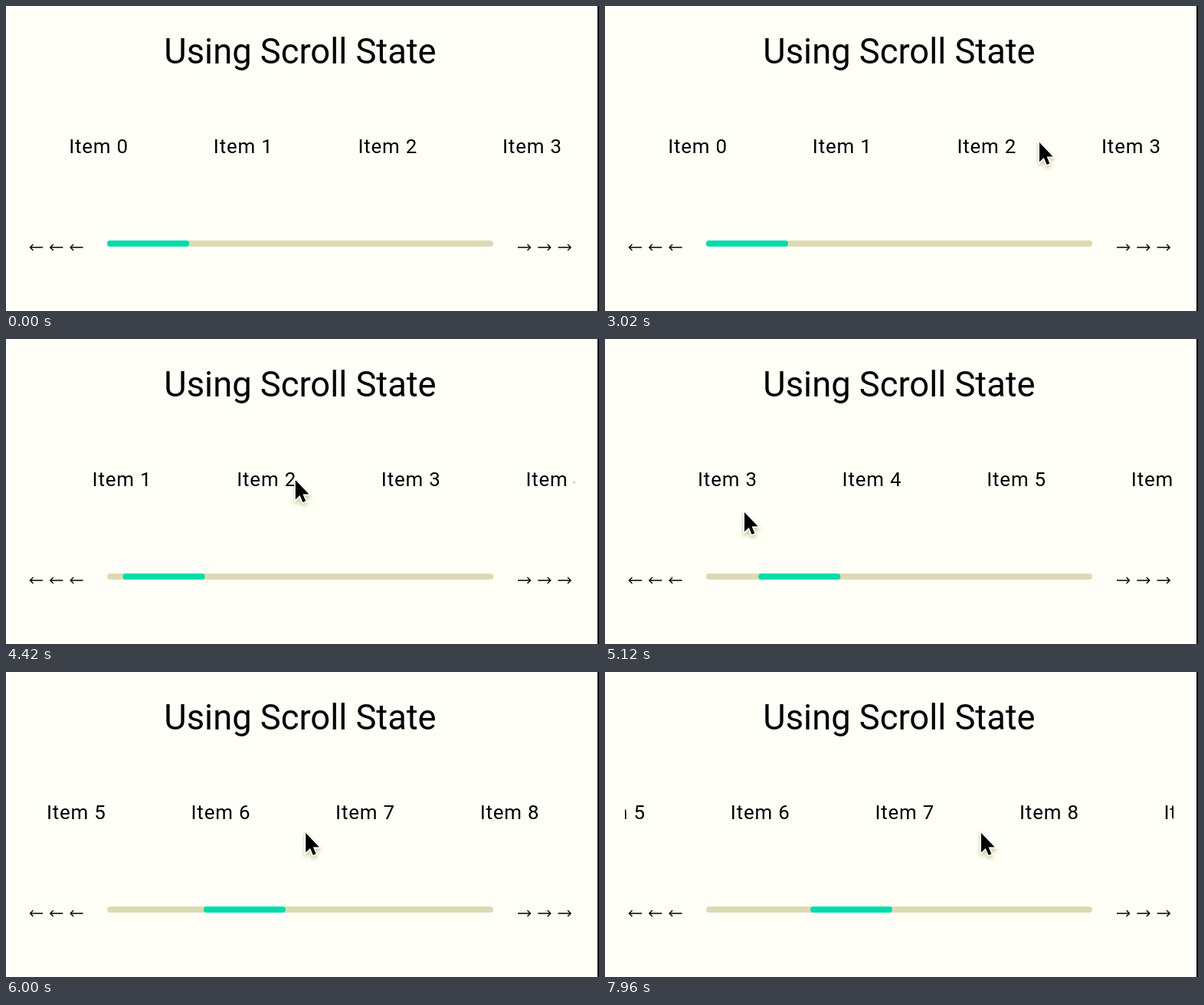
Write an HTML page with a canvas that moves like this. It is 774 px wide and 398 px high and loops after 8 s.

```html
<!DOCTYPE html>
<html lang="en">
<head>
<meta charset="utf-8">
<title>Using Scroll State</title>
<style>
  html, body { margin: 0; width: 100%; height: 100%; overflow: hidden; background: #fffff8; }
  canvas { display: block; }
</style>
</head>
<body>
<canvas id="stage" width="774" height="398"></canvas>
<script>
const ctx = document.getElementById('stage').getContext('2d');
const LOOP = 8000, PITCH = 188.6, ITEMS = 24;
const RELEASE = 4920, FLING_END = 7240, FLING_STOP = 1023, SECOND_DRAG = 7800;

// Pointer path: time, x, y
const path = [
  [0, 622, -45], [700, 622, -45], [1660, 562, 161], [1760, 562, 161],
  [2880, 567, 178], [3180, 567, 178], [3360, 536, 178], [4000, 456, 181],
  [4420, 378, 184], [4720, 322, 194], [4920, 242, 213], [5120, 182, 226],
  [5280, 182, 227], [6000, 391, 210], [6420, 470, 174], [7240, 549, 178],
  [7790, 549, 178], [7960, 491, 210], [8000, 491, 210]
];

// Monotone cubic interpolation
const rate = (i, k) => (path[i + 1][k] - path[i][k]) / (path[i + 1][0] - path[i][0]);
function slope(i, k) {
  if (i === 0 || i === path.length - 1) return 0;
  const a = rate(i - 1, k), b = rate(i, k);
  return a * b > 0 ? 2 * a * b / (a + b) : 0;
}
function pointer(t, k) {
  let i = 0;
  while (i < path.length - 2 && t >= path[i + 1][0]) i++;
  const span = path[i + 1][0] - path[i][0], u = (t - path[i][0]) / span, v = 1 - u;
  return path[i][k] * v * v * (1 + 2 * u) + path[i + 1][k] * u * u * (3 - 2 * u)
    + span * u * v * (v * slope(i, k) - u * slope(i + 1, k));
}

function scrollAt(t, x) {
  if (t < 3180) return 0;
  if (t < RELEASE) return Math.max(0, 536 - x);
  if (t < FLING_END) return FLING_STOP - 497 * ((FLING_END - t) / 2120) ** 4.25;
  return FLING_STOP + (t > SECOND_DRAG ? Math.max(0, 518 - x) : 0);
}

function text(str, x, y, size, align, spacing) {
  ctx.font = `${size}px Roboto, sans-serif`;
  ctx.textAlign = align;
  ctx.letterSpacing = spacing + 'px';
  ctx.fillText(str, x, y);
}

function pill(x, width, color) {
  ctx.fillStyle = color;
  ctx.beginPath();
  ctx.roundRect(x, 306, width, 8, 4);
  ctx.fill();
}

function arrow(tip, dir) {
  ctx.beginPath();
  ctx.moveTo(tip, 315);
  ctx.lineTo(tip + dir * 17, 315);
  ctx.moveTo(tip + dir * 4.5, 311);
  ctx.lineTo(tip + dir * 0.5, 315);
  ctx.lineTo(tip + dir * 4.5, 319);
  ctx.stroke();
}

const cursorShape = new Path2D('M0 0V25.6L5.8 20L9.6 29L13.4 27.4L9.6 18.6H17.6Z');
function cursor(x, y) {
  ctx.save();
  ctx.translate(x, y);
  ctx.save();
  ctx.shadowColor = 'rgba(110,110,0,.4)';
  ctx.shadowBlur = 5;
  ctx.shadowOffsetY = 3;
  ctx.strokeStyle = '#fff';
  ctx.lineWidth = 3.2;
  ctx.stroke(cursorShape);
  ctx.restore();
  ctx.fillStyle = '#000';
  ctx.fill(cursorShape);
  ctx.restore();
}

function draw(t) {
  const x = pointer(t, 1), y = pointer(t, 2), scroll = scrollAt(t, x);

  ctx.fillStyle = '#fffff8';
  ctx.fillRect(0, 0, 774, 398);
  ctx.fillStyle = '#000';
  ctx.fillRect(772, 0, 2, 398);
  text('Using Scroll State', 384, 75, 45.3, 'center', 0);

  ctx.save();
  ctx.beginPath();
  ctx.rect(26, 150, 716, 70);
  ctx.clip();
  for (let i = 0; i < ITEMS; i++) {
    const left = 82.2 + i * PITCH - scroll;
    if (left > -80 && left < 742) text('Item ' + i, left, 192, 25.9, 'left', 0.81);
  }
  ctx.restore();

  pill(132, 504, '#dcdab4');
  pill(132 + scroll * 0.1295, 107, '#00dcaa');

  ctx.strokeStyle = '#000';
  ctx.lineWidth = 1.4;
  for (let i = 0; i < 3; i++) {
    arrow(31 + i * 26.3, 1);
    arrow(685 + i * 26.3, -1);
  }
  cursor(x, y);
}

const start = performance.now();
function frame() {
  draw((performance.now() - start) % LOOP);
  requestAnimationFrame(frame);
}
frame();
</script>
</body>
</html>
```
